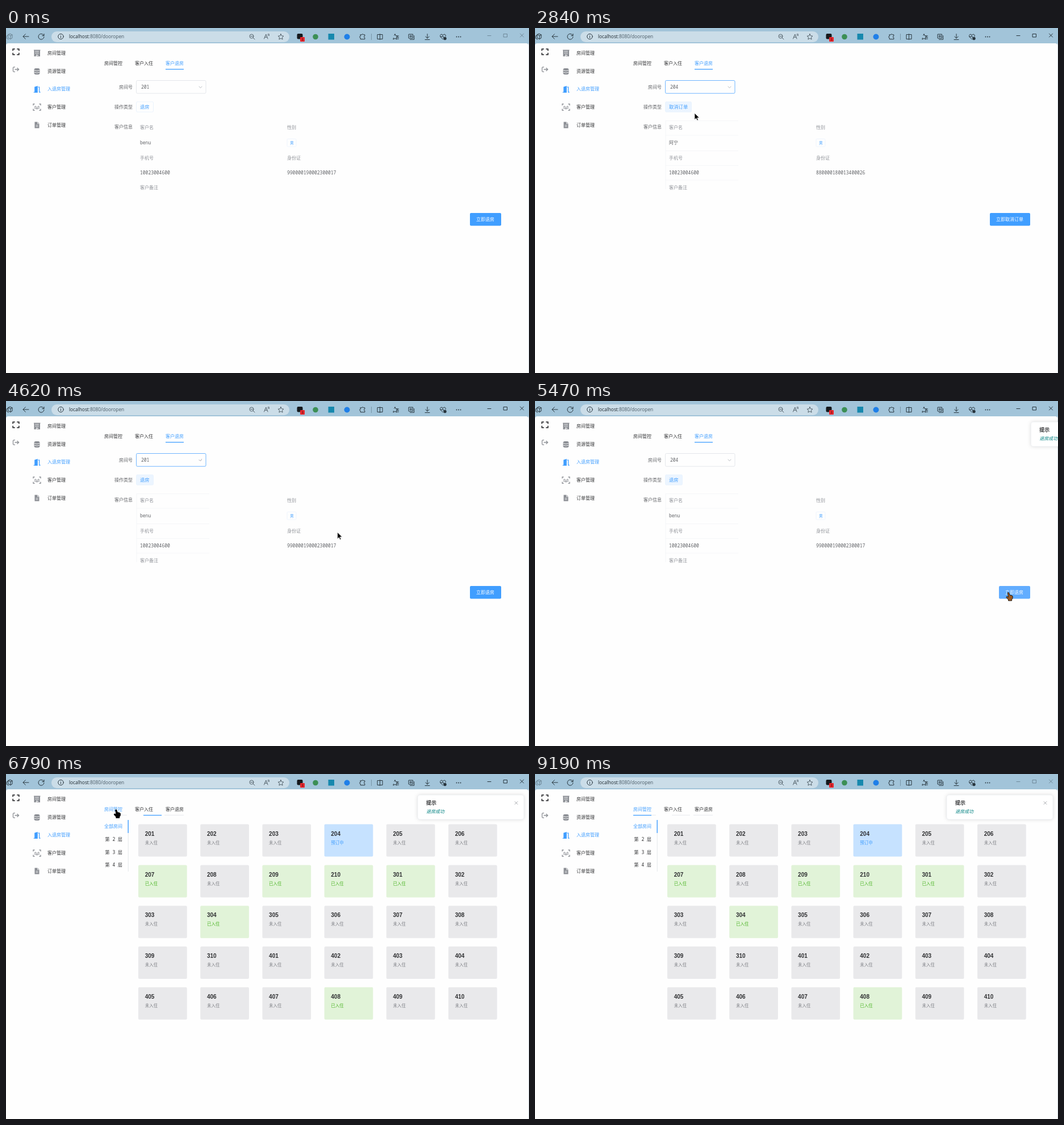
An HTML page that plays this animation: 921 by 608 pixels, repeating every 9290 ms.

```html
<!DOCTYPE html>
<html lang="zh-CN">
<head>
<meta charset="utf-8">
<title>入退房管理</title>
<style>
html, body { margin: 0; width: 100%; height: 100%; overflow: hidden; background: #fefefe; }
svg { display: block; }
text { white-space: pre; font-family: "Noto Sans Mono", "Noto Sans CJK SC", "Noto Sans CJK", monospace; }
.ui { font-family: "Open Sans", "Noto Sans", sans-serif; }
.num { font-family: "Liberation Sans", Arial, sans-serif; font-weight: 700; }
.ico { fill: none; stroke: #27343c; stroke-width: 1; stroke-linecap: round; stroke-linejoin: round; }
.side { fill: none; stroke: #8b8e94; stroke-width: 1.3; }
.card.on rect { stroke: #409eff; filter: drop-shadow(0 1px 2px #0003); }
.card.on .num { fill: #409eff; }
#list rect:first-of-type { filter: drop-shadow(0 1px 2px #0002); }
#note rect { filter: drop-shadow(0 0 3px #0002); }
</style>
</head>
<body>
<svg id="stage" width="921" height="608" viewBox="0 0 921 608"></svg>
<script>
const LOOP = 9290;
const BLUE = '#409eff';
const INK = '#303133', BODY = '#606266', MUTED = '#909399';

// Bursts of picture changes: first, last, count.
const BURSTS = [
  [560, 1140, 7], [1330, 2090, 9], [2370, 3220, 10], [3310, 3590, 4],
  [3860, 4710, 10], [4810, 5000, 3], [5380, 6300, 11], [6390, 6390, 1],
  [6680, 7550, 10], [7650, 8500, 10], [8580, 8760, 3], [9190, 9190, 1]
];
const TICKS = [0].concat(...BURSTS.map(([a, b, n]) =>
  Array.from({ length: n }, (_, i) => Math.round((a + (b - a) * i / Math.max(1, n - 1)) / 10) * 10)));

// Pointer path: time, x, y.
const PATH = [
  [560, 584, 594], [1140, 266, 102], [1330, 268, 104], [1710, 279, 133], [2090, 281, 150],
  [3220, 281, 150], [3590, 308, 110], [3860, 308, 110], [4330, 279, 133], [4430, 279, 133],
  [4710, 728, 278], [5000, 834, 337], [5570, 834, 337], [6300, 193, 64], [6390, 193, 62],
  [6770, 193, 62], [7550, 293, 101], [7650, 293, 101], [8500, 617, 565], [8670, 622, 592]
];

const GUESTS = {
  201: { name: 'benu', id: '990000190002300017', type: '退房', act: '立即退房' },
  204: { name: '阿宁', id: '880000180013400026', type: '取消订单', act: '立即取消订单' }
};
const ITEMS = [201, 204, 207, 209, 210, 301, 304, 408];
const TAKEN = [207, 209, 210, 301, 304, 408];
const TABS = [['房间管控', 173], ['客户入住', 227], ['客户退房', 281]];

const text = (x, y, s, fill = INK, size = 8, attrs = '') =>
  `<text x="${x}" y="${y + size * .37}" fill="${fill}" font-size="${size}" ${attrs}>${s}</text>`;
const rect = (x, y, w, h, fill, attrs = '') =>
  `<rect x="${x}" y="${y}" width="${w}" height="${h}" fill="${fill}" ${attrs}/>`;
const icon = (x, y, d, attrs = 'class="ico"') =>
  `<path transform="translate(${x} ${y})" d="${d}" ${attrs}/>`;
const ring = (x, y, r) => `<circle class="ico" cx="${x}" cy="${y}" r="${r}"/>`;
const star = 'M0-5L1.5-1.7L5-1.3L2.4 1.1L3.1 4.6L0 2.8L-3.1 4.6L-2.4 1.1L-5-1.3L-1.5-1.7Z';

function browserBar() {
  return rect(0, 0, 921, 34, '#a2c4d9') +
    rect(0, 27, 920, 600, '#fefefe', 'rx="4"') +
    rect(80, 6, 419, 19, '#cbdde8', 'rx="9.5"') +
    `<g id="stack">${icon(6, 15, 'M-2-3.5L1-5L5-3V2.5L2 4.5L-2 2.5ZM-2-2.5L-5-1V3L-1.5 5M-2-3.5L2-1.5V4.5M2-1.5L5-3')}</g>` +
    icon(35, 15, 'M5 0H-5M-.7-4.3L-5 0L-.7 4.3') +
    icon(62, 15, 'M4.6-1.8A5 5 0 1 0 5 .6M5-4.6V-1.4H1.8') +
    ring(96.5, 15, 4.7) + icon(96.5, 15, 'M0-.5V2.3M0-2.4V-2.3') +
    `<text class="ui" x="111" y="18" font-size="8.3" fill="#1b262d">localhost<tspan fill="#4b5c67">:8080/dooropen</tspan></text>` +
    `<g opacity=".75">` + ring(432.5, 14.5, 3.5) + icon(433, 15, 'M2.3 2.3L5 5M-2.2-.5H1.2') +
    icon(459, 15, 'M-4.5 4L-1.2-4L2 4M-3.3 1.2H.9M2.2-4.2Q3.3-3.2 2.6-2M3.7-5Q5.4-3.2 4.2-1.2') +
    icon(484, 15.5, star) + '</g>' +
    rect(512.5, 10, 10, 9.5, '#15181c', 'rx="2"') +
    rect(518, 16, 8, 8, '#e5262d', 'rx="1"') + text(522, 20, '1', '#201010', 6, 'text-anchor="middle"') +
    '<circle cx="545" cy="15.5" r="4.8" fill="#3c8f55"/>' +
    rect(567.5, 10, 10.5, 10.5, '#1688ad') +
    '<circle cx="600.5" cy="15.5" r="5" fill="#1f7fe8"/>' +
    icon(628, 15.5, 'M-3.8-3.7H-1.3A1.4 1.4 0 0 1 1.4-3.7H3.8V-1.3A1.4 1.4 0 0 0 3.8 1.5V4.2H-3.8V1.7A1.5 1.5 0 0 1-3.8-1.3Z') +
    rect(643, 10, .8, 11, '#718b9a') +
    icon(658.5, 15.5, 'M-1-4H-4.5V4H-1M1-4H4.5V4H1M0-5V5') +
    icon(685, 15.5, star, 'class="ico" stroke-dasharray="24 9"') + icon(689, 15.5, 'M-1-1.5H2.5M-.5 1H2.5M0 3.5H2.5') +
    icon(714, 15.5, 'M-4.5-4.5H2.5V2.5H-4.5ZM4.7-2V4.7H-2.5M-1-3V1M-3-1H1') +
    icon(742, 15.5, 'M0-5V2.5M-3.2-.5L0 2.7L3.2-.5M-4 5H4') +
    icon(769.5, 15.5, 'M0 4.5L-4.5 0Q-5.8-4.2-2.4-4.4Q-.6-4.3 0-2.6Q.6-4.3 2.4-4.4Q5.6-4.2 4.5-.6M-4.5 0H-2L-.8-2L.6 1L1.3 0') +
    '<circle cx="773" cy="18.5" r="2.7" fill="#27343c"/>' +
    [793.5, 797, 800.5].map(x => `<circle cx="${x}" cy="15.5" r=".9" fill="#27343c"/>`).join('') +
    `<g id="win" class="ico"><path d="M848 13.5H854M876.5 10.5H882.5V16H876.5ZM905.5 10L911.5 16M911.5 10L905.5 16"/></g>` +
    rect(920, 27, 1, 581, '#dbe3e8');
}

function sidebar() {
  const labels = ['房间管理', '资源管理', '入退房管理', '客户管理', '订单管理'];
  return icon(17.5, 42, 'M-5.3-1.7V-5H-1.7M1.7-5H5.3V-1.7M5.3 1.7V5H1.7M-1.7 5H-5.3V1.7', 'fill="none" stroke="#202124" stroke-width="1.6"') +
    icon(17.5, 73, 'M-1.5-4.2H-3.6Q-5-4.2-5-2.8V2.8Q-5 4.2-3.6 4.2H-1.5M-2 0H4.8M2-2.9L5 0L2 2.9', 'class="side"') +
    rect(49.5, 39, 10.5, 11, '#8b8e94') + rect(49, 38.5, 11.5, 1.2, '#8b8e94') +
    icon(54.7, 44, 'M-3-2.7H3M-3 .2H3M-1.2 6V3.5H1.2V6', 'fill="none" stroke="#fefefe" stroke-width="1.4" stroke-dasharray="1.5 .9"') +
    rect(49.5, 71, 10, 11, '#8b8e94', 'rx="3"') +
    icon(54.5, 76, 'M-5-1.5Q0 .8 5-1.5M-5 2Q0 4.2 5 2', 'fill="none" stroke="#fefefe" stroke-width=".9"') +
    icon(54.5, 108, 'M-4.3-4.3L1.3-6V6H-4.3ZM2.2-4.5H4.7V4.6H6.2V5.8H3.5V-3.3H2.2ZM-6 4.7H-4V5.8H-6Z', `fill="${BLUE}"`) +
    icon(54.5, 139.5, 'M-6.5-3V-5.5H-4M4-5.5H6.5V-3M6.5 3V5.5H4M-4 5.5H-6.5V3', 'class="side"') +
    icon(54.5, 139.5, 'M-4-2H-2V0H-4ZM2-2H4V0H2ZM-1-.8H1V1H-1ZM-4.6 1H-2.2V2.2H-4.6ZM2.2 1H4.6V2.2H2.2ZM-2 2H2V3.6H-2Z', 'fill="#8b8e94"') +
    icon(54.5, 171, 'M-4-5.5H1L4-2.5V5.5H-4Z', 'fill="#8b8e94"') +
    icon(54.5, 171, 'M-2 .3H2M-2 2.6H2M1-5.3V-2.4H4', 'fill="none" stroke="#fefefe" stroke-width=".8"') +
    labels.map((s, i) => text(73, 44 + i * 31.65, s, i === 2 ? BLUE : INK)).join('');
}

function form() {
  const cellLines = [163.5, 189, 216.5, 242.5, 268].map(y => `M230 ${y}H358`).join('');
  return '<g id="form">' +
    text(199, 104, '房间号', BODY) + text(191, 139, '操作类型', BODY) + text(191, 174, '客户信息', BODY) +
    rect(229.5, 92.5, 122.5, 22.7, '#fefefe', 'id="box" rx="2" stroke-width=".75"') +
    '<path id="caret" d="M238.3 99V109" stroke="#606266" stroke-width=".7"/>' +
    text(238, 104, '', BODY, 8, 'id="value"') +
    '<g id="chev"><path d="M-2.8-1.2L0 1.6L2.8-1.2" fill="none" stroke="#a8abb2" stroke-width=".8"/></g>' +
    rect(229.5, 130, 30, 18, '#fefefe', 'id="tag" rx="2" stroke="#e8f2fd" stroke-width=".9"') +
    text(236, 139, '', BLUE, 8.3, 'id="type"') +
    `<path id="cells" d="${cellLines}M230 163.5V284" fill="none" stroke="#f3f4f7" stroke-width=".8"/>` +
    text(236, 175, '客户名', MUTED) + text(495, 175, '性别', MUTED) +
    text(236, 202, '', BODY, 8, 'id="name"') +
    rect(495, 195.5, 16, 13.5, '#fefefe', 'rx="1.5" stroke="#eaf3fd" stroke-width=".8"') + text(500, 202.3, '男', BLUE, 6.8) +
    text(236, 229, '手机号', MUTED) + text(495, 229, '身份证', MUTED) +
    text(236, 255, '10023004600', BODY) + text(495, 255, '', BODY, 8, 'id="ident"') +
    text(236, 281, '客户备注', MUTED) +
    rect(817, 326, 55, 22.6, BLUE, 'id="btn" rx="2"') + text(860, 337.3, '', '#fff', 8, 'id="act" text-anchor="end"') +
    '<g id="list">' + rect(229.5, 122, 122.5, 145.5, '#fefefe', 'rx="2" stroke="#e9ebf0" stroke-width=".7"') +
    '<path d="M249.5 122.3L253 119L256.5 122.3" fill="#fefefe" stroke="#e9ebf0" stroke-width=".7"/>' +
    '<clipPath id="clip"><path d="M229 122H353V267.8H229Z"/></clipPath><g clip-path="url(#clip)">' +
    ITEMS.map((n, i) => `<g class="item">${rect(230, 125.5 + i * 19.2, 121.5, 19.2, 'none')}${text(241, 135 + i * 19.2, n, BODY, 8.2)}</g>`).join('') +
    '</g></g></g>';
}

const CARDS = Array.from({ length: 30 }, (_, i) => ({
  n: (2 + Math.floor(i / 10)) * 100 + i % 10 + 1,
  x: 233 + i % 6 * 109.2,
  y: 88.6 + Math.floor(i / 6) * 71.8
}));

function rooms() {
  const card = ({ n, x, y }) => {
    const [fill, ink, s] = n === 204 ? ['#c6e2ff', BLUE, '预订中']
      : TAKEN.includes(n) ? ['#e1f3d8', '#4cb525', '已入住'] : ['#e9e9eb', '#7d7f84', '未入住'];
    return `<g class="card">${rect(x, y, 85.7, 57, fill, 'rx="2" stroke-width=".9"')}` +
      text(x + 11.7, y + 16.5, n, INK, 10, 'class="num"') +
      text(x + 11.7, y + 32.4, s, ink, 7.5, ink[1] === '7' ? '' : 'font-weight="500"') + '</g>';
  };
  const floors = ['全部房间', '第 2 层', '第 3 层', '第 4 层'];
  return '<g id="rooms">' +
    rect(205, 72, 8, .8, '#e2e5ea') + rect(241, 72, 32, .8, '#e2e5ea') + rect(279, 72, 34, .8, '#e2e5ea') +
    rect(214.8, 81, .9, 91, '#e2e5ea') + rect(214.5, 81, 1.4, 23, BLUE) +
    floors.map((s, i) => text(205, 92.5 + i * 22.6, s, i ? INK : BLUE, 8, 'text-anchor="end"')).join('') +
    CARDS.map(card).join('') + '</g>';
}

const note = () => '<g id="note">' +
  rect(725, 37, 187, 43, '#fff', 'rx="4" stroke="#ebeef3" stroke-width=".7"') +
  text(740, 50.5, '提示', INK, 9, 'font-weight="700"') +
  text(740, 65.7, '退房成功', '#008080', 8, 'font-style="italic" font-weight="500"') +
  icon(898.5, 51, 'M-2.7-2.7L2.7 2.7M2.7-2.7L-2.7 2.7', 'stroke="#909399" stroke-width=".8"') + '</g>';

const pointer = () => '<g id="pointer">' +
  '<path id="hand" stroke="#000" stroke-width=".8" stroke-linejoin="round" d="M-1.7.9Q-.8-.5.5.8L2.1 5L5.7 5.8Q7.5 6.4 7.3 8.6L6.8 11.6L5.6 12.6V15H-.5V13L-3.8 9.5Q-4.5 7.8-3 7.5L-.4 8.6Z"/>' +
  '<path id="arrow" fill="#000" stroke="#fff" stroke-width=".7" d="M0 0V11.5L2.7 9L4.6 13L6.4 12.2L4.6 8.3H8.4Z"/></g>';

document.getElementById('stage').innerHTML = browserBar() + sidebar() +
  TABS.map(([s, x]) => text(x, 62, s, INK, 8, 'class="tab"')).join('') +
  form() + rooms() + rect(0, 72, 32, 1.3, BLUE, 'id="bar"') + note() + pointer();

const el = {};
document.querySelectorAll('[id]').forEach(e => el[e.id] = e);
const tabs = document.querySelectorAll('.tab');
const items = document.querySelectorAll('.item');
const cards = document.querySelectorAll('.card');

const show = (e, on) => e.style.display = on ? '' : 'none';
const set = (e, attrs) => { for (const k in attrs) e.setAttribute(k, attrs[k]); };
const clamp = v => Math.min(1, Math.max(0, v));
const easeOut = (t, start, power) => 1 - (1 - clamp((t - start) / 300)) ** power;

function pointerAt(t) {
  const i = PATH.findIndex(p => p[0] >= t);
  if (i < 1) return PATH[i < 0 ? PATH.length - 1 : 0].slice(1);
  const [a, b] = [PATH[i - 1], PATH[i]];
  const k = (t - a[0]) / (b[0] - a[0]);
  return [a[1] + (b[1] - a[1]) * k, a[2] + (b[2] - a[2]) * k];
}

// How far the room list is unfolded.
const unfold = (t, power) => t < 3000
  ? easeOut(t, 1330, power) - easeOut(t, 2330, power)
  : easeOut(t, 3760, power) - easeOut(t, 4400, power);

const between = (t, a, b) => t >= a && t < b;

function render(t) {
  const [x, y] = pointerAt(t);
  const seen = between(t, 560, 8760);
  const over = (l, top, w, h) => seen && x >= l && x < l + w && y >= top && y < top + h;
  const picked = between(t, 2370, 4430) || t >= 5460 ? 204 : 201;
  const guest = GUESTS[between(t, 2460, 4520) || t >= 5550 ? 204 : 201];
  const active = between(t, 1330, 9190);
  const grid = t >= 6770;
  const open = unfold(t, 4);
  const unfolded = between(t, 1330, 2370) || between(t, 3760, 4430);
  let click = false;

  set(el.stack, { opacity: active ? 1 : .45 });
  set(el.win, { opacity: active ? 1 : .4 });
  show(el.form, !grid);
  show(el.rooms, grid);

  tabs.forEach((tab, i) => {
    const hover = over(TABS[i][1], 52, 32, 22);
    click = click || hover;
    set(tab, { fill: hover || i === (grid ? 0 : 2) ? BLUE : INK });
  });
  set(el.bar, { x: 281 - 108 * easeOut(t, 6720, 2) });

  // Select and its list
  const overBox = !grid && over(229, 93, 123, 22);
  set(el.box, { stroke: between(t, 1330, 5380) ? BLUE : '#dcdfe6' });
  el.value.textContent = picked;
  set(el.value, { fill: unfolded ? '#b4b7bd' : BODY });
  show(el.caret, unfolded);
  set(el.chev, { transform: `translate(342.5 104) rotate(${-180 * unfold(t, 1.7)})` });
  show(el.list, open > .01);
  set(el.list, {
    transform: `translate(0 122) scale(1 ${open}) translate(0 -122)`,
    opacity: clamp(open * 1.07)
  });
  let hot = ITEMS.findIndex((_, i) => over(230, 125.5 + i * 19.2, 122, 19.2));
  if (hot < 0) hot = ITEMS.indexOf(picked);
  items.forEach((item, i) => {
    const mine = ITEMS[i] === picked;
    set(item.children[0], { fill: i === hot ? '#f3f7fc' : 'none' });
    set(item.children[1], { fill: mine ? BLUE : BODY, 'font-weight': mine ? 700 : 400 });
  });

  // Guest details
  const wide = guest === GUESTS[204];
  el.type.textContent = guest.type;
  el.name.textContent = guest.name;
  el.ident.textContent = guest.id;
  el.act.textContent = guest.act;
  set(el.tag, { width: wide ? 46 : 30, fill: t < 1330 ? '#fefefe' : '#ecf5ff' });
  show(el.cells, t >= 1330);
  const overBtn = !grid && over(wide ? 801 : 817, 326, wide ? 71 : 55, 23);
  set(el.btn, {
    x: wide ? 801 : 817, width: wide ? 71 : 55,
    fill: overBtn ? '#62adff' : t > 5560 ? '#53a8ff' : BLUE
  });

  cards.forEach((card, i) => {
    const hover = grid && over(CARDS[i].x, CARDS[i].y, 85.7, 57);
    card.classList.toggle('on', hover);
    click = click || hover;
  });

  show(el.note, t >= 5380);
  set(el.note, { transform: `translate(${195 * (1 - clamp((t - 5420) / 300)) ** 1.5} 0)` });

  click = click || overBox || overBtn || (open > .1 && over(230, 122, 122, 145));
  show(el.pointer, seen);
  set(el.pointer, { transform: `translate(${x} ${y})` });
  show(el.hand, click);
  show(el.arrow, !click);
  set(el.hand, { fill: overBtn ? '#9a5a22' : '#000' });
}

let last = -1;
function tick() {
  const now = performance.now() % LOOP;
  const t = TICKS.reduce((best, s) => s <= now ? s : best, 0);
  if (t !== last) render(last = t);
  requestAnimationFrame(tick);
}
tick();
</script>
</body>
</html>
```
